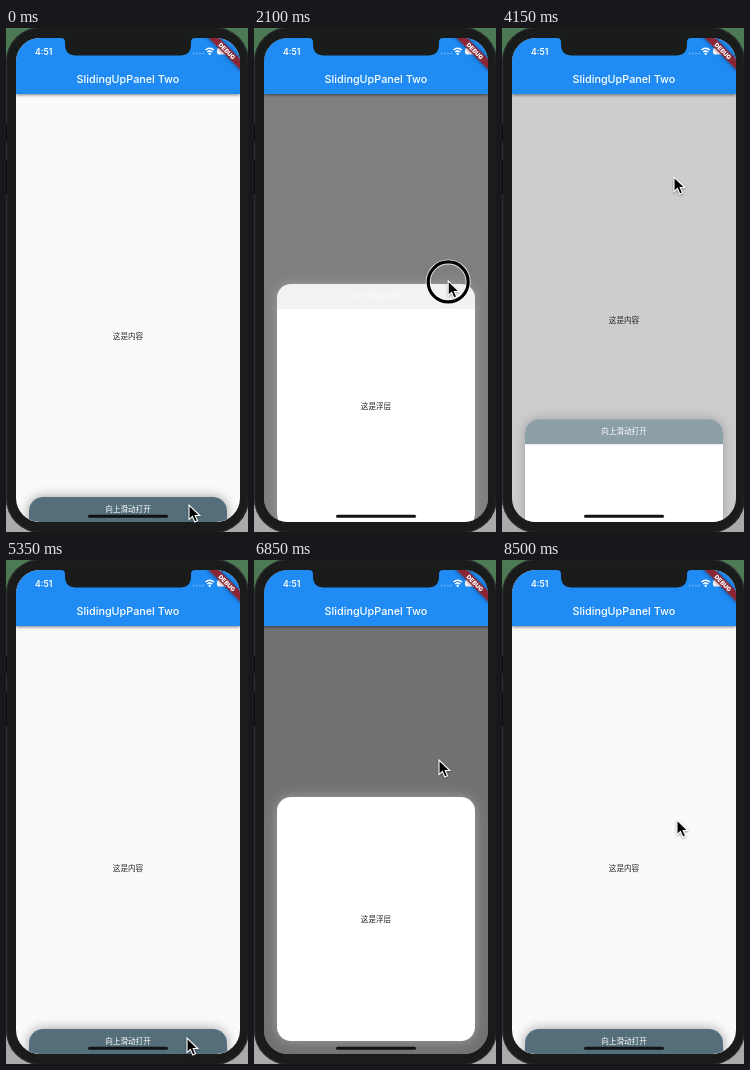
An HTML page that plays this animation: 242 px wide and 504 px high, repeating every 8550 ms.

```html
<!DOCTYPE html>
<html lang="zh">
<head>
<meta charset="utf-8">
<title>Sliding panel</title>
<style>
html, body { margin: 0; width: 100%; height: 100%; overflow: hidden; }
body {
  position: relative;
  background: linear-gradient(#4c7a55 0 60px, #2b2d2c 110px 400px, #a9aaa9 460px);
  font-family: "Noto Sans CJK SC", "Noto Sans CJK", sans-serif;
}
div { position: absolute; box-sizing: border-box; }
#stage { left: 0; top: 0; width: 242px; height: 504px; overflow: hidden; }
#phone {
  left: 0; top: -1px; width: 243px; height: 506px;
  border-radius: 35px; background: #1a1b1b;
  box-shadow: inset 0 0 1px 1px #303131;
}
.key { left: 0; width: 1px; background: #0b0b0b; }
#screen {
  left: 10px; top: 10px; width: 224px; height: 484px;
  border-radius: 24px; overflow: hidden; background: #fafafa;
}
.label { left: 0; width: 100%; text-align: center; font-size: 7.6px; white-space: nowrap; }
#content { top: 288px; line-height: 20px; color: #2a2a2a; }
#shade { inset: 0; background: #000; }
#panel {
  left: 13px; top: 227px; width: 198px; height: 244px;
  border-radius: 14px; background: #fff; box-shadow: 0 0 12px #9e9e9e;
}
#inner { top: 112px; line-height: 20px; color: #222; }
#header {
  left: 0; top: 0; width: 100%; height: 25px;
  border-radius: 14px 14px 0 0; background: #546e7a;
}
#header .label { top: 2px; line-height: 20px; color: #fff; }
#bar {
  left: 0; top: 0; width: 100%; height: 56px;
  background: #1f8bf3; box-shadow: 0 1px 3px rgba(0, 0, 0, .5);
}
svg { position: absolute; left: 0; top: 0; }
text { font-family: Inter, sans-serif; fill: #fff; }
</style>
</head>
<body>
<div id="stage">
  <div id="phone"></div>
  <div class="key" style="top:96px;height:17px"></div>
  <div class="key" style="top:132px;height:34px"></div>
  <div id="screen">
    <div id="content" class="label">这是内容</div>
    <div id="shade"></div>
    <div id="panel">
      <div id="inner" class="label">这是浮层</div>
      <div id="header"><div class="label">向上滑动打开</div></div>
    </div>
    <div id="bar"></div>
  </div>
  <svg width="242" height="504" viewBox="0 0 242 504">
    <defs>
      <clipPath id="clip"><rect x="10" y="10" width="224" height="484" rx="24"/></clipPath>
    </defs>
    <text x="29" y="26.5" font-size="8.6" font-weight="600">4:51</text>
    <text x="122" y="55" font-size="10.8" font-weight="500" text-anchor="middle">SlidingUpPanel Two</text>
    <g fill="#fff" opacity=".35">
      <circle cx="188" cy="25.5" r=".9"/><circle cx="191" cy="25.5" r=".9"/>
      <circle cx="194" cy="25.5" r=".9"/><circle cx="197" cy="25.5" r=".9"/>
    </g>
    <g fill="none" stroke="#fff" stroke-width="1.4">
      <path d="M199.5 22.1Q203.7 18.3 207.9 22.1M201.2 24Q203.7 21.8 206.2 24"/>
      <circle cx="203.7" cy="25.7" r=".5"/>
    </g>
    <rect x="211" y="20" width="12.5" height="6.5" rx="1.8" fill="#fff"/>
    <g clip-path="url(#clip)">
      <g transform="translate(234 10) rotate(45)">
        <rect x="-26" y="14.8" width="52" height="7.4" fill="#8c2434"
          style="filter:drop-shadow(0 0 2px rgba(0,0,0,.5))"/>
        <text y="20.7" font-size="6" font-weight="900" text-anchor="middle">DEBUG</text>
      </g>
    </g>
    <path fill="#1a1b1b" d="M55 9V10Q59 10 59 14V16Q59 27.5 70 27.5H174Q185 27.5 185 16V14Q185 10 189 10V9Z"/>
    <rect x="82" y="486.8" width="80" height="3" rx="1.5" fill="#101214"/>
    <g id="cursor">
      <g id="ring" fill="none">
        <circle cy="1" r="20" stroke="#fff" stroke-opacity=".8" stroke-width="5"/>
        <circle cy="1" r="20" stroke="#000" stroke-width="3.2"/>
      </g>
      <path d="M0 0V14.6L3.4 11.5L5.8 17L8.5 15.8L6.2 10.5H10.8Z" fill="#000" stroke="#fff"
        stroke-width="1.1" style="filter:drop-shadow(0 1px 1px rgba(0,0,0,.35))"/>
    </g>
  </svg>
</div>
<script>
const LOOP = 8550, STEP = 50, TRAVEL = 232;
// Pointer stops: time, x, y
const stops = [
  [0, 183, 477], [1100, 184, 477], [2300, 195, 235], [2800, 182, 235], [3200, 182, 235],
  [3750, 172, 149], [4400, 172, 149], [5250, 181, 478], [5600, 181, 478],
  [6500, 186, 234], [6850, 185, 200], [7000, 185, 200], [7400, 178, 150],
  [8050, 178, 150], [8500, 175, 260], [LOOP, 175, 260]
];
const presses = [[1050, 2350], [3900, 4050], [5550, 6550], [7500, 7650]];
const cycles = [
  { drag: 1100, drop: 2300, close: 4050, from: 477 },
  { drag: 5600, drop: 6500, close: 7650, from: 478 }
];
const SLOP = 11;

const $ = id => document.getElementById(id);
const [content, shade, panel, header, cursor, ring] =
  ["content", "shade", "panel", "header", "cursor", "ring"].map($);
const clamp = v => Math.min(1, Math.max(0, v));
const smooth = u => u * u * (3 - 2 * u);

function pointer(t) {
  const i = stops.findIndex(s => s[0] > t);
  const [t0, x0, y0] = stops[i - 1], [t1, x1, y1] = stops[i];
  const k = smooth((t - t0) / (t1 - t0));
  return [x0 + (x1 - x0) * k, y0 + (y1 - y0) * k];
}

// Critically damped spring from open to closed
function settle(ms) {
  const w = Math.sqrt(500), s = ms / 1000;
  const p = (1 + (w - 1) * s) * Math.exp(-w * s);
  return p < 0.002 ? 0 : p;
}

function openness(t, y) {
  const c = cycles.filter(c => t >= c.drag).pop();
  if (!c) return 0;
  if (t < c.drop) return clamp((c.from - y - SLOP) / TRAVEL);
  return t < c.close ? 1 : settle(t - c.close);
}

function draw(t) {
  const [x, y] = pointer(t);
  const p = openness(t, y);
  panel.style.transform = `translateY(${(1 - p) * TRAVEL}px)`;
  content.style.transform = `translateY(${-0.2 * p * TRAVEL}px)`;
  header.style.opacity = 1 - p;
  shade.style.opacity = 0.54 * p;
  cursor.setAttribute("transform", `translate(${x} ${y})`);
  const down = presses.some(([a, b]) => t >= a && t < b);
  ring.setAttribute("visibility", down ? "visible" : "hidden");
}

const start = performance.now();
function tick() {
  const t = (performance.now() - start) % LOOP;
  draw(Math.floor(t / STEP) * STEP);
  requestAnimationFrame(tick);
}
tick();
</script>
</body>
</html>
```
